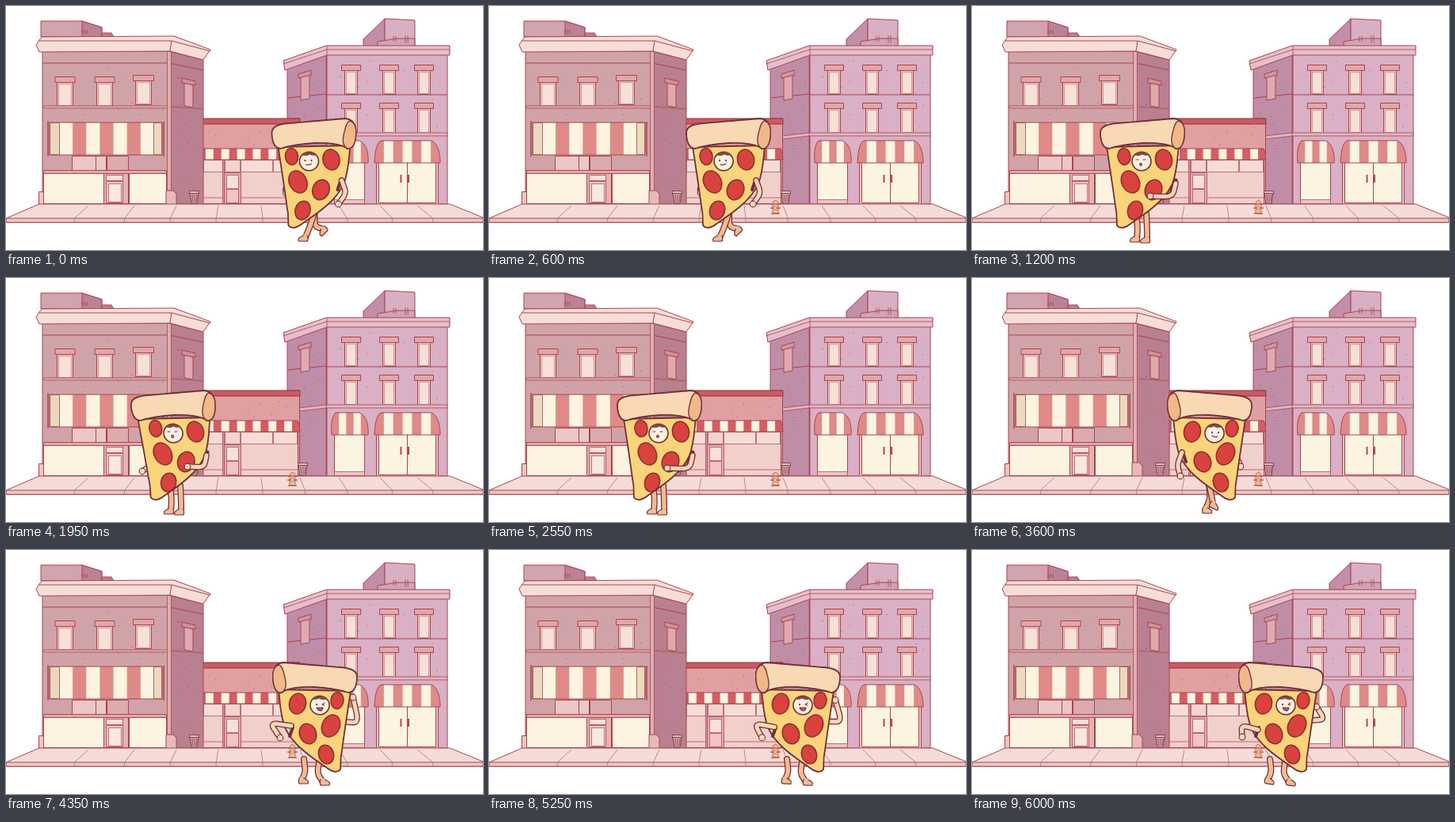
These frames come from a looping animation (602 px wide and 308 px high, 6.15 s). An HTML page with a canvas:

```html
<!DOCTYPE html>
<html lang="en">
<head>
<meta charset="utf-8">
<title>Pizza stroll</title>
<style>
html, body { margin: 0; width: 100%; height: 100%; overflow: hidden; background: #fff; }
canvas { display: block; width: 602px; height: 308px; }
</style>
</head>
<body>
<canvas id="stage" width="602" height="308"></canvas>
<script>
const stage = document.getElementById('stage');
let ctx = stage.getContext('2d');
const TAU = Math.PI * 2, STEP = 150, LOOP = 6150;
const LINE = '#a8444f', PINK = '#f3c6c2', GLASS = '#f8e0d7', CREAM = '#fcf4e0', RED = '#df8a88';
const INK = '#74303a', SKIN = '#f8d5b8', LEG = '#f2bb92';
const mix = (a, b, k) => a + (b - a) * k;
const mixPoints = (a, b, k) => a.map((p, i) => [mix(p[0], b[i][0], k), mix(p[1], b[i][1], k)]);

function paint(path, fill, stroke = LINE, width = 1) {
  if (fill) { ctx.fillStyle = fill; ctx.fill(path); }
  if (stroke) { ctx.strokeStyle = stroke; ctx.lineWidth = width; ctx.stroke(path); }
}
const shape = (d, fill, stroke, width) => paint(new Path2D(d), fill, stroke, width);
function box(x0, y0, x1, y1, fill, stroke, width) {
  const p = new Path2D();
  p.rect(x0 + .5, y0 + .5, x1 - x0 - 1, y1 - y0 - 1);
  paint(p, fill, stroke, width);
}
function oval(x, y, rx, ry, turn, fill, stroke, width) {
  const p = new Path2D();
  p.ellipse(x, y, rx, ry, turn, 0, TAU);
  paint(p, fill, stroke, width);
}

// Alternating vertical stripes inside an outline
function stripes(d, x0, x1, count, colors) {
  const p = new Path2D(d), width = (x1 - x0) / count;
  ctx.save();
  ctx.clip(p);
  for (let i = 0; i < count; i++) {
    ctx.fillStyle = colors[i % 2];
    ctx.fillRect(x0 + i * width, 0, width + .5, 308);
  }
  ctx.restore();
  paint(p, null);
}

function sash(x, y, w, h, lip) {
  box(x, y + 7, x + w, y + h, PINK);
  box(x + 2, y + 9, x + w - 2, y + h - 1, GLASS, '#c77b80', .7);
  box(x - lip, y, x + w + lip, y + 8, '#e3a6a8');
}

function speckle(x, y, w, h, count, seed) {
  ctx.fillStyle = 'rgba(140,55,75,.5)';
  for (let i = 0; i < count; i++) {
    seed = seed * 16807 % 2147483647;
    const px = x + seed % w;
    seed = seed * 16807 % 2147483647;
    ctx.fillRect(px, y + seed % h, 1.4, 1);
  }
}

function leftBuilding() {
  shape('M44 19H96L121 27V39H44Z', '#d0a5ad');
  shape('M96 19L121 27V39H96Z', '#ba8293');
  shape('M121 34H133L136 39H121Z', '#ba8293');
  shape('M96 30V35M99 30V35M102 30V35', null);
  shape('M46 57H205V250H46Z', '#d0a3a9');
  shape('M205 57L249 68V250H205Z', '#b98091');
  shape('M47 72H204M206 72L249 81', null);
  speckle(50, 75, 150, 66, 20, 71);
  speckle(212, 84, 34, 140, 14, 93);
  shape('M38 49L45 39L212 38L258 55L249 68L207 57L42 58Z', '#f8ddd7');
  shape('M42 44H209L258 57M209 44L207 57', null);
  box(203, 57, 209, 250, '#e0aeb0', LINE, .8);
  [64, 114].forEach(x => sash(x, 89, 21, 38, 2.5));
  sash(163, 87, 21, 38, 3);
  shape('M225 97L236 99V128L225 126Z', '#e0a9aa');
  shape('M222 91L239 95V100L222 97Z', '#cf9096');
  shape('M47 126H204V129H47ZM209 127L249 130', '#dba9ac', LINE, .8);
  stripes('M55 147H197V188H55Z', 67, 187, 7, [CREAM, RED]);
  box(55, 147, 68, 188, '#ecd9bd', LINE, .8);
  box(186, 147, 197, 188, '#ecd9bd', LINE, .8);
  shape('M53 145V190M199 146V190', null, LINE, 1.5);
  box(83, 189, 114, 208, '#ebc8c5');
  box(113, 189, 127, 208, '#ebc8c5');
  box(127, 189, 155, 208, '#dcabad');
  box(47, 207, 203, 212, '#e2aaac');
  box(47, 211, 125, 250, CREAM);
  box(155, 211, 203, 250, CREAM);
  box(123, 211, 155, 250, '#e6b2b2');
  box(126, 213, 148, 221, GLASS, LINE, .8);
  box(126, 221, 148, 249, '#f2c9c4', LINE, .8);
  box(129, 224, 146, 248, '#fae8dc', LINE, .7);
  box(41, 234, 48, 251, '#f0c4c2');
  shape('M202 233H211L215 237V251H202Z', '#e9b9b9');
}

function middleBuilding() {
  box(243, 144, 371, 250, '#dfa0a1', '#a63d49');
  shape('M241 142H371V149H241Z', '#c65c64', '#9d303f');
  speckle(250, 153, 114, 24, 9, 37);
  box(248, 192, 369, 250, '#f1cfca');
  box(249, 194, 274, 210, '#f6dcd5', LINE, .7);
  box(273, 193, 276, 250, '#df959a', LINE, .7);
  box(276, 194, 296, 210, '#f4d3cf', LINE, .7);
  box(275, 210, 297, 250, '#e3aaae', LINE, .8);
  box(278, 213, 294, 231, '#f8e0d7', LINE, .7);
  box(278, 231, 294, 249, '#efc5c2', LINE, .7);
  box(296, 194, 337, 210, '#f6dcd5', LINE, .7);
  box(337, 194, 368, 210, '#f6dcd5', LINE, .7);
  shape('M249 242H274M297 242H368', null, LINE, .7);
  stripes('M246 180H368Q371 185 371 194H242Q242 185 246 180Z', 242, 371, 13, ['#d45d64', CREAM]);
}

function rightBuilding() {
  shape('M451 42L478 16V51H451Z', '#c28ea8');
  shape('M478 16L516 18V51H478Z', '#d8b0c4');
  shape('M469 45L493 41H516V52H469Z', '#d0a4ba');
  shape('M489 38V45M492 38V45M504 37V47M507 37V47', null, LINE, .8);
  shape('M355 79L405 61V250H370V142H355Z', '#c08da7');
  shape('M405 61H557V250H405Z', '#d9b0c5');
  shape('M350 69L404 50H560V62H405L352 81Z', '#e6bfca');
  shape('M350 73L405 55H560M405 50V62', null, LINE, .8);
  speckle(358, 88, 42, 120, 16, 29);
  speckle(410, 68, 142, 90, 18, 51);
  shape('M356 116L404 111M405 112H557', null);
  [427, 475, 519].forEach(x => {
    sash(x, 74, 17, 38, 4);
    sash(x, 122, 17, 39, 4);
  });
  shape('M372 89L383 86V117L372 119Z', '#e0a9b2');
  shape('M369 86L385 81V87L369 91Z', '#d397a3');
  shape('M370 164L405 160H557V164H405L370 168Z', '#e0b4c3', LINE, .8);
  shape('M404 62V250', null, LINE, .8);
  box(414, 190, 453, 250, CREAM);
  box(414, 244, 453, 250, '#eac4c5', LINE, .7);
  box(467, 190, 546, 251, '#eec3c2');
  box(470, 194, 543, 249, CREAM);
  shape('M506.5 198V249', null);
  shape('M498.5 213V223M508 213V223', null, '#b34751', 2);
  stripes('M411 198C410 185 411 175 416 170H446C454 173 458 184 457 198Z', 411, 457, 5, [RED, CREAM]);
  stripes('M465 198C466 184 467 174 473 170H537C545 174 548 185 548 198Z', 465, 548, 7, [RED, CREAM]);
}

function trashCan(x) {
  shape(`M${x} 236H${x + 11}L${x + 9} 249H${x + 2}Z`, '#c9a0a5', '#8c3d4a');
  shape(`M${x + 3} 238L${x + 4} 247M${x + 6} 238V247M${x + 9} 238L${x + 8} 247`, null, '#8c3d4a', .7);
  box(x - 1, 233, x + 12, 237, '#e3bfc0', '#8c3d4a');
}

function street() {
  shape('M42 250H560L602 267V273H0V268Z', '#f5dcd8');
  shape('M0 268H602V273H0Z', '#efc8c5');
  [104, 162, 215, 268, 322, 371, 420, 472, 519].forEach(x => {
    const drift = (x - 300) * .09;
    shape(`M${x} 252L${x + drift} 268V273`, null, '#bd6a73', .8);
  });
  trashCan(232);
  trashCan(369);
  shape('M358 262V252Q357 247 361.5 245Q366 247 365 252V262Z', '#f2bd94', '#bb6255');
  shape('M356 250H367M356 262H367M355 255H368', null, '#bb6255', 1.6);
  oval(361.5, 255, 2, 2, 0, '#f9d3b3', '#bb6255', .8);
}

// A limb through three points, outlined, bending at the middle one
function limb([a, b, c], width, color) {
  ctx.lineCap = ctx.lineJoin = 'round';
  const p = new Path2D(`M${a}L${mix(a[0], b[0], .6)},${mix(a[1], b[1], .6)}Q${b} ${mix(b[0], c[0], .4)},${mix(b[1], c[1], .4)}L${c}`);
  paint(p, null, INK, width + 2.6);
  paint(p, null, color, width);
}
function arm(points) {
  limb(points, 5, SKIN);
  const [x, y] = points[2];
  oval(x, y, 3.8, 3.8, 0, SKIN, INK, 1.2);
  oval(x, y, 3.2, 3.2, 0, SKIN, null);
}
function leg(hip, knee, ankle, tilt = 0) {
  limb([hip, knee, ankle], 5.4, LEG);
  ctx.save();
  ctx.translate(...ankle);
  ctx.rotate(tilt);
  shape('M3 -3C4 0 4 4 2 4H-8C-10 1 -7 -1 -3 -3Z', LEG, INK, 1.2);
  oval(0, -2, 2.4, 3, 0, LEG, null);
  ctx.restore();
}

function face(x, y, mood) {
  oval(x, y, 12, 11.8, 0, '#fff1e2', INK, 1.6);
  shape(`M${x - 8} ${y - 8}Q${x} ${y - 14} ${x + 8} ${y - 8}Q${x + 3} ${y - 7} ${x + 1} ${y - 9}Q${x - 3} ${y - 6} ${x - 8} ${y - 8}Z`, '#8a4a45', INK, .7);
  const line = (d, fill) => shape(d, fill, INK, 1.1);
  const dot = dx => oval(x + dx, y - 1, 1, 1.2, 0, INK, null);
  if (mood === 'walk') {
    dot(-5); dot(3);
    line(`M${x - 4} ${y + 4}Q${x - 1} ${y + 6} ${x + 3} ${y + 3}`);
  } else if (mood === 'whistle') {
    line(`M${x - 7} ${y - 2}H${x - 4}M${x + 2} ${y - 2}H${x + 5}`);
    oval(x - 1, y + 4, 1.5, 1.8, 0, '#d17a75', INK, 1);
  } else {
    dot(4);
    line(`M${x - 6} ${y - 3}L${x - 3} ${y - 1}L${x - 6} ${y}`);
    line(`M${x - 4} ${y + 3}H${x + 4}Q${x + 2} ${y + 7} ${x - 1} ${y + 7}Q${x - 3} ${y + 7} ${x - 4} ${y + 3}Z`, '#c9545a');
  }
}

const PEPPERONI = [[26, 48, 8, 10.5, -.1], [76, 52, 10.5, 13, -.2], [34, 80, 11, 14.5, -.45], [63, 90, 10.5, 13, .35], [40, 116, 9.5, 12, .3]];

function slice(mood) {
  const shift = mood === 'whistle' ? 5 : 0;
  const body = new Path2D('M9 36C13 62 17 88 20 111C23 124 21 130 22 135C26 140 33 138 39 133C56 121 81 106 92 82C98 66 98 52 100 34Z');
  paint(body, '#fad47a', null);
  ctx.save();
  ctx.clip(body);
  PEPPERONI.forEach(([x, y, rx, ry, turn]) => oval(x + shift, y, rx, ry, turn, '#d8423f', '#8e2c32', 1.5));
  shape('M101 36C98 56 98 68 92 84C82 107 57 123 38 136', null, '#f6c27f', 4);
  ctx.restore();
  paint(body, null, INK, 1.8);
  face(48 + shift, 54, mood);
  shape('M1 18C1 11 9 7 22 6C46 4 72 2 93 0C104 0 108 10 107 22C106 32 103 39 96 38C91 33 72 30 55 31C38 32 25 34 12 38C4 38 1 28 1 18Z', '#f8d9b4', INK, 1.8);
  shape('M99 3C105 4 108 11 107 22C106 32 103 38 97 38C90 35 90 27 92 19C94 11 95 5 99 3Z', '#f1b888', INK, 1.3);
}

function walker(phase) {
  const foot = p => {
    const swing = Math.cos(TAU * p);
    const lift = 13 * Math.max(0, Math.sin(TAU * (p - .4)));
    leg([55, 118], [52 - swing * 3, 136], [55 - swing * 13, 151 - lift], -lift * .07);
  };
  const sway = Math.cos(TAU * phase);
  foot(phase + .56);
  foot(phase + .06);
  arm([[25, 82], [18, 88], [15 + sway * 4, 96 - sway * 2]]);
  slice('walk');
  shape('M88 78L84 90', null, '#6d3040', 4);
  arm([[89, 78], [95, 94], [91 - sway * 6, 108]]);
}

function whistler(lean) {
  leg([47, 127], [48, 140], [47, 152]);
  leg([59, 120], [60, 140], [60, 153]);
  arm(mixPoints([[30, 86], [20, 94], [27, 103]], [[27, 86], [21, 95], [11, 102]], lean));
  ctx.save();
  ctx.transform(1, 0, lean * .034, 1, -lean * 4.8, 0);
  slice('whistle');
  ctx.restore();
  shape(`M${96 - lean * 3} 78L${91 - lean * 3} 91`, null, '#6d3040', 5);
  arm(mixPoints([[96, 82], [92, 99], [64, 98]], [[92, 82], [89, 97], [68, 96]], lean));
}

function flexer(drop) {
  leg([68, 122], [66, 138], [71, 149], drop * -.15);
  leg([49, 126], [51, 140], [44, 151], drop * -.1);
  arm(mixPoints([[16, 75], [-1, 76], [6, 44]], [[16, 73], [-1, 72], [9, 56]], drop));
  slice('flex');
  shape('M82 82L86 93', null, '#6d3040', 4);
  arm(mixPoints([[84, 80], [111, 76], [98, 95]], [[83, 85], [104, 79], [103, 94]], drop));
}

function place(x, facing, draw) {
  ctx.save();
  ctx.translate(x, 142);
  ctx.scale(facing, 1);
  draw();
  ctx.restore();
}

const LEANS = [0, .35, .7, .5, .8, 1, 1, .7, .3, 0, .3, .7, 1];
function character(n) {
  if (n < 8) place(334.5 - n * 21.6, 1, () => walker(n / 4));
  else if (n < 21) place(161, 1, () => whistler(LEANS[n - 8]));
  else if (n < 29) place(354 + (n - 24) * 22, -1, () => walker((n - 21) / 4));
  else place(444, -1, () => flexer((1 - Math.cos(Math.PI * 3 * (n - 29) / 11)) / 2));
}

const backdrop = document.createElement('canvas');
backdrop.width = 602;
backdrop.height = 308;
const stageCtx = ctx;
ctx = backdrop.getContext('2d');
ctx.fillStyle = '#fff';
ctx.fillRect(0, 0, 602, 308);
[rightBuilding, middleBuilding, leftBuilding, street].forEach(draw => draw());
ctx = stageCtx;

function render() {
  ctx.drawImage(backdrop, 0, 0);
  character(Math.floor(performance.now() % LOOP / STEP));
  requestAnimationFrame(render);
}
render();
</script>
</body>
</html>
```
